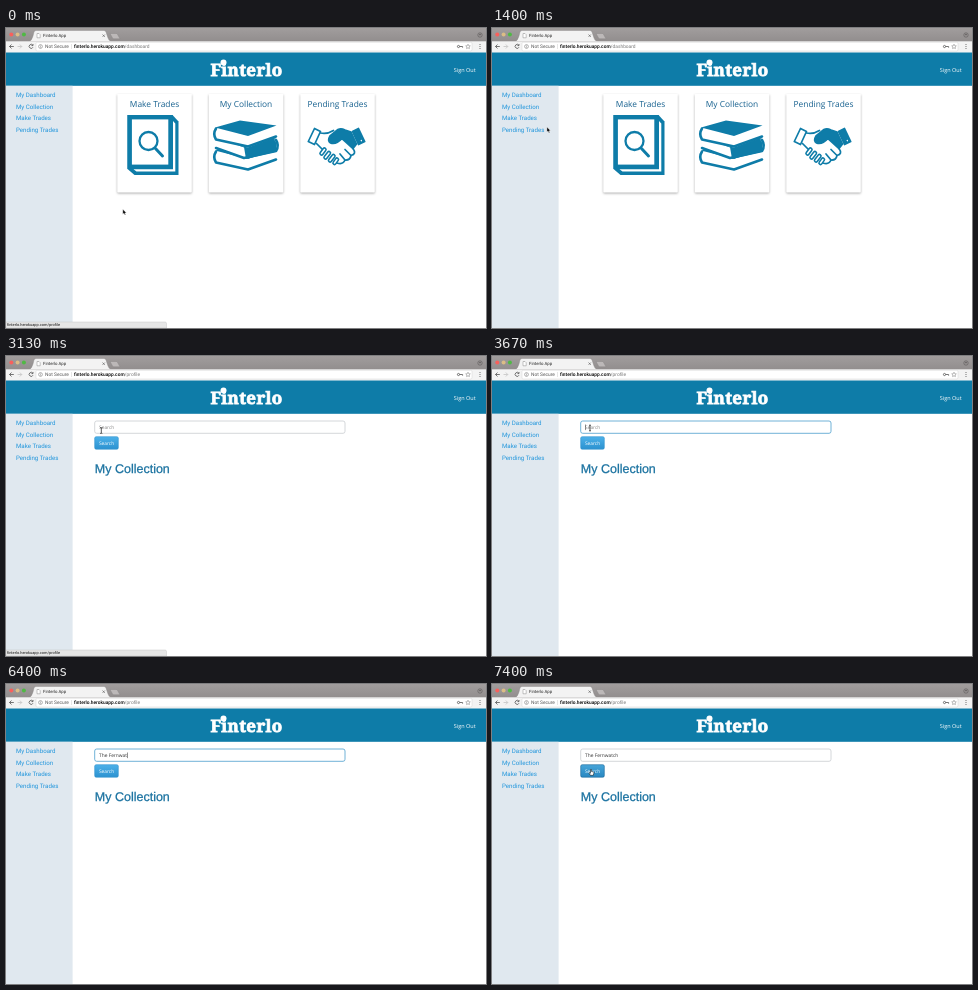
Recreate the animation shown at these times as an HTML page. Size 480 by 300 pixels, loop 8 s.

```html
<!DOCTYPE html>
<html lang="en">
<head>
<meta charset="utf-8">
<title>Finterlo App</title>
<style>
  html, body { margin: 0; width: 100%; height: 100%; overflow: hidden; background: #fff; }
  svg { display: block; width: 100vw; height: 100vh; }
  text { font-family: Roboto, sans-serif; text-rendering: geometricPrecision; white-space: pre; }
  .open { font-family: "Open Sans", sans-serif; }
  .mid { text-anchor: middle; }
  .chrome { font-size: 4.85px; fill: #555; }
  .link { font-size: 6.15px; fill: #2196dc; }
  .link.hover { fill: #12649c; text-decoration: underline; }
  .ink { fill: none; stroke: #0e7ca8; stroke-linejoin: round; stroke-linecap: round; }
  .ink.solid, .solid { fill: #0e7ca8; }
  .card { fill: #fff; filter: drop-shadow(0 1px 1px rgba(0, 0, 0, .32)); }
  .cardTitle { font-size: 8.4px; fill: #17618f; }
</style>
</head>
<body>
<svg viewBox="0 0 480 300">
  <defs>
    <linearGradient id="strip" x2="0" y2="1">
      <stop stop-color="#a19d9d"/><stop offset="1" stop-color="#918d8d"/>
    </linearGradient>
    <linearGradient id="blue" x2="0" y2="1">
      <stop stop-color="#4cb1e9"/><stop offset="1" stop-color="#2c92d0"/>
    </linearGradient>
    <g id="book">
      <path d="M210 101Q206 106 210 112L242 119.500L270 109V98L242 107Z" fill="#fff"/>
      <path class="solid" d="M209 99.500L234 92.500L270.500 97.500L242 108Z"/>
      <path class="ink" stroke-width="2.600" d="M210 100.500Q206.500 106 210 111.500L242 118.500L270 108.500"/>
    </g>
  </defs>

  <!-- Browser window -->
  <rect width="480" height="14" fill="url(#strip)"/>
  <circle cx="5.300" cy="6.500" r="2" fill="#f8605c"/>
  <circle cx="11.600" cy="6.500" r="2" fill="#dcbd85"/>
  <circle cx="17.900" cy="6.500" r="2" fill="#4fb944"/>
  <path d="M23 13.500Q25.500 13 27 8L28 4Q28.500 2.500 30 2.500H98Q99.500 2.500 100 4L102 10Q103 13 105 13.500Z" fill="#f3f3f3" stroke="#8a8686" stroke-width=".4"/>
  <path d="M104 5.500H111L114 10.800H107Z" fill="#bcb8b8" stroke="#858181" stroke-width=".4"/>
  <rect y="13.300" width="480" height="11.300" fill="#f3f3f3"/>
  <path d="M31 5.500H33L34.200 6.700V9.800H31Z" fill="#fff" stroke="#888" stroke-width=".5"/>
  <text x="37" y="9.300" font-size="4.300" fill="#222">Finterlo App</text>
  <path d="M96.500 6.500l2.400 2.400m0-2.400l-2.400 2.400" stroke="#555" stroke-width=".6"/>
  <circle cx="474" cy="7" r="2.200" fill="none" stroke="#5d5959" stroke-width=".6"/>
  <circle cx="474" cy="6.600" r=".8" fill="#5d5959"/>
  <rect x="30" y="14.300" width="436" height="8.700" rx="1.200" fill="#fff" stroke="#ccc" stroke-width=".4"/>
  <g fill="none" stroke-width=".8">
    <path d="M7.800 18.500H3.500m2-2l-2 2l2 2" stroke="#555"/>
    <path d="M11.500 18.500H15.800m-2-2l2 2l-2 2" stroke="#c4c4c4"/>
    <path d="M26.800 17.200a2 2 0 1 0 .2 2M27 16v1.600h-1.600" stroke="#555"/>
    <circle cx="34.500" cy="18.500" r="1.900" stroke="#666" stroke-width=".5"/>
    <path d="M34.500 18.200v1.400m0-2.300v.5" stroke="#666" stroke-width=".5"/>
    <path d="M65.500 16v5" stroke="#ccc" stroke-width=".5"/>
    <circle cx="452.500" cy="18.500" r="1.100" stroke="#555"/>
    <path d="M453.600 18.500h3v1.200" stroke="#555"/>
    <path d="M462 16.200l.7 1.500l1.600.2l-1.200 1.100l.3 1.600l-1.400-.8l-1.400.8l.3-1.600l-1.200-1.100l1.600-.2Z" stroke="#777" stroke-width=".5"/>
  </g>
  <g fill="#666"><circle cx="474" cy="16.500" r=".6"/><circle cx="474" cy="18.500" r=".6"/><circle cx="474" cy="20.500" r=".6"/></g>
  <text class="chrome" x="39" y="20.200">Not Secure</text>
  <text class="chrome" x="68" y="20.200"><tspan fill="#000" font-weight="500">finterlo.herokuapp.com</tspan><tspan id="path" fill="#777"></tspan></text>

  <!-- Site frame -->
  <rect y="24.500" width="480" height="33.300" fill="#0e7ca8"/>
  <text class="mid" x="240.500" y="48" style="font: 900 17px 'Noto Serif', serif; letter-spacing: .3px" fill="#fff" stroke="#fff" stroke-width=".8">Finterlo</text>
  <circle cx="217.500" cy="34.500" r="3" fill="#fff"/>
  <text class="open" x="447.800" y="43.600" font-size="5.500" font-weight="500" fill="#fff">Sign Out</text>
  <rect y="57.800" width="66.600" height="243" fill="#e0e8ef"/>
  <g id="links"></g>

  <!-- Dashboard -->
  <g id="dashboard">
    <g id="cards"></g>
    <path class="solid" d="M121.500 87H166.500L172.500 93.500V147H128.500L121.500 141Z"/>
    <path d="M167 93L169.300 95.500V143.500H130.500L127.500 141.200H167Z" fill="#fff"/>
    <rect x="123.700" y="89.200" width="40.800" height="49.600" fill="#fff" stroke="#0e7ca8" stroke-width="4.400"/>
    <circle class="ink" cx="142.500" cy="113" r="9" stroke-width="2.300"/>
    <path class="ink" stroke-width="3" d="M149.500 120.500L156.500 128"/>
    <use href="#book" y="23"/>
    <use href="#book" transform="translate(480 11.500) scale(-1 1)"/>
    <path class="solid" d="M238 119L268 111Q273 117 269 124L240 131Z"/>
    <use href="#book"/>
    <g class="ink" stroke-width="1.700">
      <path d="M302.300 113.500L308.500 100.500L314.500 103.500L308.500 116.500Z"/>
      <path class="solid" d="M358.700 113.500L352.500 100.500L346.500 103.500L352.500 116.500Z"/>
      <path d="M314.500 105Q321 106.500 327.500 102.500M310.500 115.500L317 122"/>
      <path class="solid" d="M324 108L332 101.500Q335 100 339 102L345 104L350.500 116L347 120.500L336 110.500Q330 117 324.500 115Q321 113 324 108Z"/>
      <path d="M347 120.500Q351 126 345 127.500Q344 132.500 339 132Q337 137 331 135L328 133.500"/>
      <path d="M339 121.500l6 6M334 126l5 6"/>
    </g>
    <path id="fingers" class="ink" stroke-width="4.600" d="M315.500 125.500l3-4M319.500 129.500l3.500-4.500M324 132.500l3.500-4.500M328.500 135l2.500-3.500"/>
    <path d="M315.500 125.500l3-4M319.500 129.500l3.500-4.500M324 132.500l3.500-4.500M328.500 135l2.500-3.500" fill="none" stroke="#fff" stroke-width="1.500" stroke-linecap="round"/>
    <path d="M355.300 112.500l.1.200M305.800 112.300l.1.200" stroke="#fff" stroke-width="1.400" stroke-linecap="round"/>
  </g>

  <!-- Collection -->
  <g id="collection">
    <rect id="field" x="88.700" y="65" width="250.300" height="12.300" rx="2" fill="#fff" stroke-width=".8"/>
    <text id="query" class="open" x="93" y="73" font-size="4.850"></text>
    <rect id="caret" y="68.500" width=".5" height="5.600" fill="#222"/>
    <rect id="button" x="88.700" y="80.700" width="23.600" height="12.500" rx="1.500" fill="url(#blue)" stroke-width=".6"/>
    <text class="open mid" x="100.500" y="88.700" font-size="4.850" fill="#fff">Search</text>
    <text x="88.800" y="117" style="font-family: 'Liberation Sans', Arial, sans-serif" font-size="12.500" fill="#17709f" stroke="#17709f" stroke-width=".25">My Collection</text>
  </g>

  <g id="status">
    <path d="M0 294H159Q160.500 294 160.500 295.500V300H0Z" fill="#e6e6e6" stroke="#bbb" stroke-width=".4"/>
    <text x="1" y="298.400" font-size="3.930" fill="#111">finterlo.herokuapp.com/profile</text>
  </g>

  <g id="pointer">
    <path id="arrow" d="M0 0V5L1.200 4L2 5.900L2.900 5.500L2.100 3.700H3.600Z" fill="#000" stroke="#fff" stroke-width=".4"/>
    <path id="hand" d="M-.5 0Q0-.6.5 0V2L2.600 2.500Q3.100 2.700 2.900 3.600L2.300 5.800H-.6L-2 3.600Q-1.800 2.900-.5 3.700Z" fill="#fff" stroke="#000" stroke-width=".5"/>
    <path id="beam" d="M-1-3Q0-3 0-2.300Q0-3 1-3M0-2.300V2.300M-1 3Q0 3 0 2.300Q0 3 1 3" fill="none" stroke="#111" stroke-width=".7"/>
  </g>
</svg>
<script>
const LOOP = 8000, PAGE_CHANGE = 2470, FOCUS = 3470, BLUR = 7200;
const TITLE = 'The Fernwatch';
const KEY_TIMES = [4530, 4670, 4730, 4870, 5130, 5270, 5400, 5870, 6000, 6130, 6400, 6470, 6530];
const MOVES = [ // time, x, y
  [0, 116.8, 181.2], [70, 116.8, 181.2], [200, 115.8, 181.2], [930, 115.8, 181.2],
  [1600, 38.5, 77], [2930, 38.5, 77], [3130, 95.3, 74.5], [3670, 98, 72],
  [6800, 98, 72], [7270, 99, 85.5], [LOOP, 99, 85.5]
];
const $ = id => document.getElementById(id);
const show = (id, on) => $(id).style.display = on ? '' : 'none';
const clamp = v => Math.max(0, Math.min(1, v));
const ramp = (t, a, b) => clamp((t - a) / (b - a));

$('links').innerHTML = ['My Dashboard', 'My Collection', 'Make Trades', 'Pending Trades']
  .map((label, i) => `<text class="link" x="10" y="${69 + i * 11.7}">${label}</text>`).join('');
$('cards').innerHTML = ['Make Trades', 'My Collection', 'Pending Trades']
  .map((label, i) => {
    const x = 111.3 + i * 91.5;
    return `<path class="card" d="M${x} 66h74.500v97.500q0 1-1 1h-72.500q-1 0-1-1Z"/>
      <text class="cardTitle open mid" x="${x + 37.2}" y="79">${label}</text>`;
  }).join('');
const collectionLink = $('links').children[1];

function pointerAt(t) {
  const next = Math.max(1, MOVES.findIndex(m => m[0] > t));
  const [t0, x0, y0] = MOVES[next - 1], [t1, x1, y1] = MOVES[next];
  const p = ramp(t, t0, t1), e = p * p * (3 - 2 * p);
  return [x0 + (x1 - x0) * e, y0 + (y1 - y0) * e];
}

function draw(t) {
  const onCollection = t >= PAGE_CHANGE;
  const focused = t >= FOCUS && t < BLUR;
  const [x, y] = pointerAt(t);
  const inside = (left, top, right, bottom) => x >= left && x <= right && y >= top && y <= bottom;
  const overLink = inside(10, 74, 48, 83);
  const overField = onCollection && inside(89, 65, 339, 77);
  const overButton = onCollection && inside(89, 81, 112, 93);

  show('dashboard', !onCollection);
  show('collection', onCollection);
  $('path').textContent = onCollection ? '/profile' : '/dashboard';
  collectionLink.classList.toggle('hover', overLink);
  $('status').style.opacity = t < 1000
    ? 1 - ramp(t, 70, 200)
    : ramp(t, 1470, 1600) * (1 - ramp(t, 3140, 3330));

  const typed = TITLE.slice(0, KEY_TIMES.filter(k => k <= t).length);
  $('query').textContent = typed || 'Search';
  $('query').setAttribute('fill', typed ? '#333' : '#888');
  $('field').setAttribute('stroke', focused ? '#4c9fcd' : '#c9cdd1');
  show('caret', focused);
  if (focused) $('caret').setAttribute('x', 93.1 + (typed ? $('query').getComputedTextLength() : 0));
  $('button').setAttribute('stroke', overButton ? '#1e6fa5' : '#3193cd');
  $('button').style.filter = overButton ? 'brightness(.93)' : '';

  show('pointer', t < KEY_TIMES[0] || t >= 6800);
  show('hand', overLink || overButton);
  show('beam', overField);
  show('arrow', !overLink && !overButton && !overField);
  $('pointer').setAttribute('transform', `translate(${x} ${y})`);
}

const start = performance.now();
function tick() {
  draw((performance.now() - start) % LOOP);
  requestAnimationFrame(tick);
}
tick();
</script>
</body>
</html>
```
